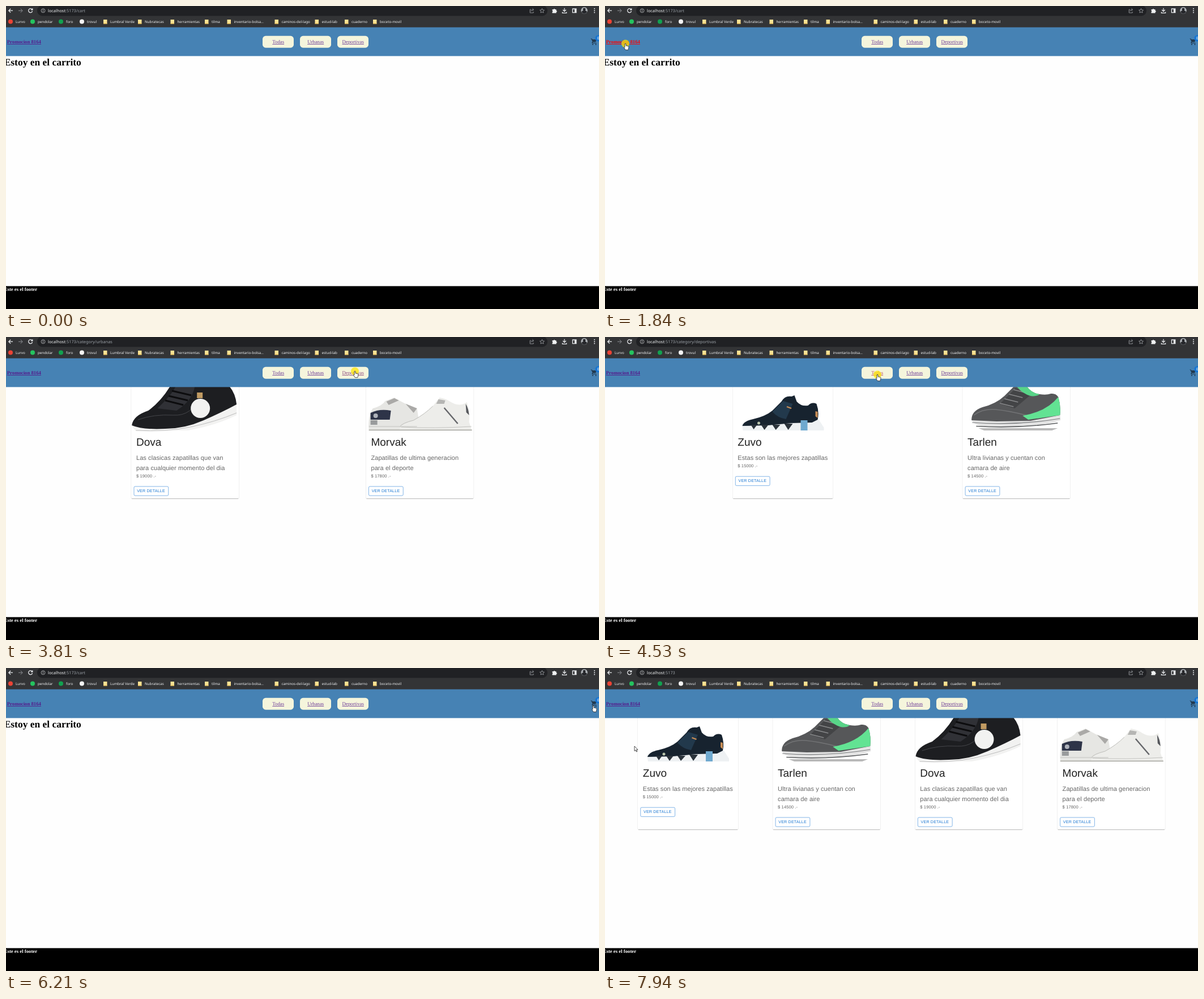
These frames come from a looping animation (1047 px wide and 535 px high, 7990 ms). An HTML page:

```html
<!DOCTYPE html>
<html lang="es">
<head>
<meta charset="utf-8">
<title>Tienda</title>
<style>
  html, body { margin: 0; width: 100%; height: 100%; overflow: hidden; background: #fff; }
  svg { display: block; width: 100%; height: 100%; }
  text { white-space: pre; text-rendering: geometricPrecision; }
  .ui { font-family: "Noto Sans", "Open Sans", sans-serif; fill: #f1f3f4; }
  .serif { font-family: "Liberation Serif", serif; font-size: 8.72px; }
  .card { font-family: "Liberation Sans", sans-serif; }
  .link { text-decoration: underline; }
  .icon { fill: none; stroke: #e8eaed; stroke-width: 1.3; }
  .dim { stroke: #8d9094; stroke-width: 1; }
</style>
</head>
<body>
<svg id="stage" viewBox="0 0 1047 535" preserveAspectRatio="none"></svg>
<script>
const LOOP = 7990;

const path = (d, fill, extra = '') => `<path d="${d}" fill="${fill}" ${extra}/>`;
const line = (d, stroke, width) => path(d, 'none', `stroke="${stroke}" stroke-width="${width}"`);
const rect = (x, y, w, h, fill, extra = '') =>
  `<rect x="${x}" y="${y}" width="${w}" height="${h}" fill="${fill}" ${extra}/>`;
const circle = (x, y, r, fill, extra = '') =>
  `<circle cx="${x}" cy="${y}" r="${r}" fill="${fill}" ${extra}/>`;
const icon = (d, extra = '') => `<path class="icon ${extra}" d="${d}"/>`;
const text = (x, y, s, attrs = '') => `<text x="${x}" y="${y}" ${attrs}>${s}</text>`;

// Browser chrome
const marks = [
  [17, 'Lurvo', '#ea4335'], [56, 'pendolar', '#25c35f'], [106, 'foro', '#12a150'], [143, 'trovul', '#f4f4f4'],
  [184, 'Lumbral Verde'], [245, 'Nubratecas'], [302.5, 'herramientas'], [363, 'tilma'],
  [402.5, 'inventario-bolsa...'], [486.5, 'caminos-del-lago'], [557.5, 'estud-lab'],
  [610, 'cuaderno'], [660, 'boceto-movil']
];

function chrome() {
  const bookmarks = marks.map(([x, name, dot]) =>
    (dot ? circle(x - 9, 27.5, 4, dot)
         : rect(x - 12, 24, 6.5, 7.5, '#fde293') + rect(x - 12, 30.3, 6.5, 1.2, '#e3bd55')) +
    text(x, 29.7, name, 'class="ui" font-size="6.25"')).join('');
  return rect(0, 0, 1047, 37.6, '#333436') +
    rect(55, -1, 901, 18.5, '#202124', 'rx="9"') +
    icon('M12 8.2H5M8.2 4.8L4.8 8.2l3.4 3.4') +
    icon('M22 8.2h7M25.8 4.8l3.4 3.4-3.4 3.4', 'dim') +
    icon('M46.2 6.2A3.5 3.5 0 1 0 46.6 9M46.8 4.2v2.6h-2.6') +
    circle(65.5, 8.2, 3.4, 'none', 'stroke="#b8babd" stroke-width=".9"') +
    path('M65 7.6h1v2.5h-1zM65 6h1v1h-1z', '#b8babd') +
    icon('M927 6.2h-1.8v5.8h6V10M926.8 9.4q.6-3 4-3M929.4 4.2l2.4 2.2-2.4 2.2', 'dim') +
    icon('M946.5 4.4l1.2 2.6 2.8.3-2.1 1.9.6 2.8-2.5-1.4-2.5 1.4.6-2.8-2.1-1.9 2.8-.3z', 'dim') +
    path('M964.5 6h2.2a1.4 1.4 0 0 1 2.7 0h2.1v2.2a1.3 1.3 0 0 1 0 2.6v1.7h-7v-2.2a1.2 1.2 0 0 0 0-2.3z', '#f1f3f4') +
    icon('M986 3.8v5.4M983.2 6.8l2.8 2.8 2.8-2.8M982.4 10.4v1.9h7.2v-1.9') +
    icon('M1000.4 5h6.4v6.6h-6.4z') + rect(1003.8, 5, 3, 6.6, '#e8eaed') +
    circle(1021, 7.8, 5.8, '#aeb2b6') + circle(1021, 6, 2.4, '#25262a') +
    path('M1016 10.8q1.2-3 5-3t5 3q-5 5.4-10 0z', '#25262a') +
    [4.8, 8.2, 11.6].map(y => circle(1039, y, 1, '#e8eaed')).join('') +
    `<text class="ui" x="74" y="10.8" font-size="7.35">localhost<tspan id="url" fill="#9aa0a6"></tspan></text>` +
    bookmarks;
}

// Shop header and footer
const navLink = (id, x, label, extra = '') =>
  text(x, 66, label, `id="${id}" class="serif link" fill="#551a8b" ${extra}`);

function header() {
  const buttons = [['todas', 'Todas'], ['urbanas', 'Urbanas'], ['deportivas', 'Deportivas']]
    .map(([id, label], i) => {
      const x = 453 + 66 * i;
      return rect(x, 52.8, 55, 20.9, '#f5f5dc', 'rx="5.5"') +
        navLink(id, x + 27.7, label, 'text-anchor="middle" fill-opacity=".85"');
    }).join('');
  return rect(0, 37, 1047, 51.4, '#4682b4') + navLink('brand', 1.8, 'Promocion 8164', 'font-weight="bold"') +
    buttons +
    path('M1032.5 57.6h2.1l.6 1.3h8.2l-2.5 4.9h-4.5l-.6 1.2h6.8v1.1h-7.4q-1.4-.4-.7-1.8l.9-1.6-2-4.5h-.9z', '#223a50') +
    circle(1036, 67.8, 1.15, '#223a50') + circle(1041.4, 67.8, 1.15, '#223a50') +
    circle(1046, 57, 5.8, '#1976d2') +
    text(1043.8, 59.4, '0', 'class="card" font-size="6.6" fill="#fff"');
}

const footer = () => rect(0, 494.6, 1047, 41, '#000') +
  text(-3.3, 502.8, 'Este es el footer', 'class="serif" font-weight="bold" fill="#fff"');

// Shoe pictures, x relative to the card
const runner =
  path('M16 153Q60 149 100 152L152 146L161 160V165H18Z', '#eef1f3') +
  path('M17 157Q20 148 36 145Q58 140 70 130L86 114Q92 103 104 105L109 103L113 114Q121 123 133 121Q140 114 148 118Q153 132 150 146L140 151L104 152L62 156Z', '#17232f') +
  path('M70 132L89 113L106 118L94 145Q80 143 70 132Z', '#22394c') +
  path('M32 155l5 8 6-8zM50 155l6 9 7-9zM70 155l6 9 8-9zM91 153l7 11 8-11z', '#2b333b') +
  path('M146 131l4 1v11l-4-3zM96 122l8 3-1 2-8-3z', '#c98d55') +
  rect(120, 147, 12, 18, '#6fa9cf') + circle(46, 152, 2.5, '#b9c4ac');

const trainer =
  path('M15 144Q95 148 172 134L173 147Q150 155 110 158H40Q18 156 15 144Z', '#e4e4e4') +
  path('M16 147Q15 131 35 124Q59 118 74 104L90 88H114Q122 99 136 101Q148 103 156 100Q165 99 169 106Q174 122 172 138L120 148L60 149Z', '#565759') +
  path('M66 118L94 90L118 104L92 126Z', '#434446') +
  line('M66 117l24 6M74 109l24 6M82 101l24 6M90 93l20 5', '#88898b', 1.5) +
  line('M20 138Q36 126 58 128T112 138', '#737476', 1.5) +
  path('M106 139Q148 132 169 106Q174 122 172 138L116 146Z', '#62e393') +
  path('M96 88h18q8 11 22 13-6 5-16 3-14-4-24-16z', '#58d488') +
  line('M17 151Q95 157 172 144', '#77797b', 1.2) +
  line('M24 157.5Q95 162 168 152', '#5a5c5e', 1.6) +
  path('M28 161H168L158 165H38Z', '#b9b9b9');

const leather =
  path('M1 152Q60 163 100 153T186 116V138Q150 156 100 165H8Q2 162 1 152Z', '#f2f2f1') +
  path('M1 156Q3 139 30 130Q52 114 68 88H174Q184 100 186 119Q162 132 128 147T60 162Q20 164 1 156Z', '#1d1e21') +
  path('M46 126Q70 104 78 88H112Q108 112 80 130Z', '#303136') +
  line('M60 112l32 8M66 104l34 8M72 95l34 8', '#0c0c0e', 3) +
  line('M12 146Q40 136 74 138T120 104', '#45464a', 1) +
  line('M8 165Q60 168 104 159T186 134', '#bbb', 1) +
  circle(122, 126, 17, '#f2f2f1') + rect(116, 98, 10, 10, '#c09a62');

const pair =
  path('M5 164Q3 140 12 126Q28 122 34 113L50 107Q60 113 68 117L90 126L96 164Z', '#e6e6e3') +
  path('M8 134Q24 126 44 130L42 146H8Z', '#2e3448') + circle(17, 139, 4, '#aeb2ba') +
  path('M36 114l14-6 8 4-18 8zM70 118l20 8-6 8z', '#aaa9a7') + rect(8, 147, 12, 8, '#999b9c') +
  path('M59 164Q60 153 84 147Q104 136 118 122L130 107Q142 109 150 115Q166 124 178 115Q184 132 182 150L187 165H59Z', '#ededea') +
  line('M60 158Q64 152 84 147Q104 136 118 122', '#bdbdb9', 1) +
  path('M128 110l12 2-2 6-14 0z', '#b5b5b3') +
  line('M138 125L162 153', '#65666a', 2.4) +
  path('M176 118q5 8 6 20l-5-5z', '#55575c') +
  line('M5 158H90M62 159Q120 162 186 158', '#c3c3c0', 1) +
  line('M5 164.4H187', '#96968f', 1.2);

const products = [
  { name: 'Zuvo', w: 177, price: 15000, shoe: runner, lines: ['Estas son las mejores zapatillas'] },
  { name: 'Tarlen', w: 190, price: 14500, shoe: trainer, lines: ['Ultra livianas y cuentan con', 'camara de aire'] },
  { name: 'Dova', w: 190, price: 19000, shoe: leather, lines: ['Las clasicas zapatillas que van', 'para cualquier momento del dia'] },
  { name: 'Morvak', w: 190, price: 17800, shoe: pair, lines: ['Zapatillas de ultima generacion', 'para el deporte'] }
];

function card({ name, w, price, shoe, lines }, x) {
  const dy = 17.7 * (lines.length - 1);
  return `<g class="card" transform="translate(${x} 0)">` +
    rect(-.5, 80, w + 1, 205.8, '#000', 'rx="2.5" opacity=".1"') +
    line(`M1 285.2H${w - 1}`, '#aaa', 1.1) +
    rect(0, 80, w, 205, '#fff', 'rx="2"') + shoe +
    text(8.8, 192, name, 'font-size="19" fill="#212121"') +
    lines.map((s, n) => text(8.8, 216.8 + 17.7 * n, s,
      'font-size="11" letter-spacing=".08" fill="#666"')).join('') +
    text(8.8, 230 + dy, `$ ${price} .-`, 'font-size="7.63" letter-spacing=".08" fill="#666"') +
    rect(4.8, 246.2 + dy, 60.8, 16.2, 'none', 'rx="2" stroke="#1976d2" stroke-opacity=".6" stroke-width=".9"') +
    text(10, 256.4 + dy, 'VER DETALLE', 'font-size="7.09" letter-spacing=".2" fill="#1976d2"') + '</g>';
}

// Cards spread with equal gaps over the page width
function shelf(items) {
  const left = -3.3, width = 1053.4;
  const gap = (width - items.reduce((sum, p) => sum + p.w, 0)) / (items.length + 1);
  let x = left;
  return items.map(p => {
    x += gap;
    const out = card(p, x);
    x += p.w;
    return out;
  }).join('');
}

const pages = {
  cart: { url: '/cart', body: text(-3.3, 104.5, 'Estoy en el carrito',
    'class="serif" font-weight="bold" style="font-size:17.44px"') },
  home: { url: '', body: shelf(products) },
  urban: { url: '/category/urbanas', body: shelf(products.slice(2)) },
  sport: { url: '/category/deportivas', body: shelf(products.slice(0, 2)) }
};

// Timeline
const route = [[0, 'cart'], [1960, 'home'], [3200, 'urban'], [3940, 'sport'],
  [4660, 'home'], [6210, 'cart'], [7610, 'home']];

const clicks = [
  [1840, 1960, 'brand', '#f00'], [3030, 3200, 'urbanas', '#b0304f'], [3750, 3940, 'deportivas', '#7a2a70'],
  [4530, 4660, 'todas', '#b0304f'], [5940, 6210], [7480, 7610, 'brand', '#f00']
];

const moves = [
  [160, 949, 486], [300, 800, 420], [500, 380, 230], [700, 120, 100], [840, 27, 60], [910, 35, 64],
  [1050, 35, 64], [1230, 38, 67], [1380, 38, 67], [1690, 36, 66], [2180, 36, 66],
  [2400, 200, 240], [2520, 330, 255], [2750, 520, 130], [2930, 553, 68], [3000, 554, 66], [3200, 554, 66],
  [3700, 616, 60], [4000, 616, 60], [4450, 481, 66], [5070, 481, 66],
  [5140, 455, 140], [5240, 640, 345], [5340, 950, 218], [5410, 950, 218], [5600, 1020, 110],
  [5810, 1037, 66], [6490, 1037, 66], [6700, 720, 196], [6900, 380, 180], [7080, 110, 90],
  [7190, 30, 57], [7350, 35, 64], [7410, 36, 66], [7800, 36, 66], [7860, 38, 80], [7940, 52, 138]
];

const hotspots = [[2, 62], [470, 492], [532, 562], [593, 632], [1031, 1047]];
const linkIds = ['brand', 'todas', 'urbanas', 'deportivas'];

function pointer(t) {
  const n = moves.findIndex(m => m[0] > t);
  if (n < 0) return moves[moves.length - 1].slice(1);
  const [t0, x0, y0] = moves[n - 1], [t1, x1, y1] = moves[n];
  const k = (t - t0) / (t1 - t0);
  return [x0 + (x1 - x0) * k, y0 + (y1 - y0) * k];
}

const outline = 'stroke="#222" stroke-width=".8" stroke-linejoin="round"';
const cursor = '<g id="cursor">' +
  circle(0, .5, 7, '#ffe600', 'id="glow" fill-opacity=".72"') +
  path('M0 0V8.6L2 6.8L3.4 10L4.8 9.4L3.4 6.3H6Z', '#fff', `id="arrow" ${outline}`) +
  path('M-1 .8Q0-.6 1 .8V4L5 5Q6 5.3 6 6.3L5.4 9.6L4.8 11.6H.4L-2.4 7.6Q-2.6 6.2-1 7Z', '#fff', `id="hand" ${outline}`) +
  '</g>';

document.getElementById('stage').innerHTML =
  rect(0, 0, 1047, 535, '#fefefe') +
  Object.entries(pages).map(([id, p]) => `<g id="${id}">${p.body}</g>`).join('') +
  header() + chrome() + footer() + cursor;

const el = id => document.getElementById(id);
const show = (id, on) => { el(id).style.display = on ? '' : 'none'; };

function render(t) {
  const page = route.filter(r => r[0] <= t).pop()[1];
  for (const id in pages) show(id, id === page);
  el('url').textContent = ':5173' + pages[page].url;

  const click = clicks.find(c => t >= c[0] && t < c[1]);
  for (const id of linkIds) el(id).style.fill = click && click[2] === id ? click[3] : '';

  const visible = t >= moves[0][0];
  show('cursor', visible);
  if (!visible) return;
  const [x, y] = pointer(t);
  const onLink = y > 56 && y < 70 && hotspots.some(([a, b]) => x >= a && x <= b);
  el('cursor').setAttribute('transform', `translate(${x.toFixed(2)} ${y.toFixed(2)})`);
  show('glow', !!click);
  show('hand', onLink);
  show('arrow', !onLink);
}

const start = performance.now();
function tick() {
  render((performance.now() - start) % LOOP);
  requestAnimationFrame(tick);
}
render(0);
requestAnimationFrame(tick);
</script>
</body>
</html>
```
